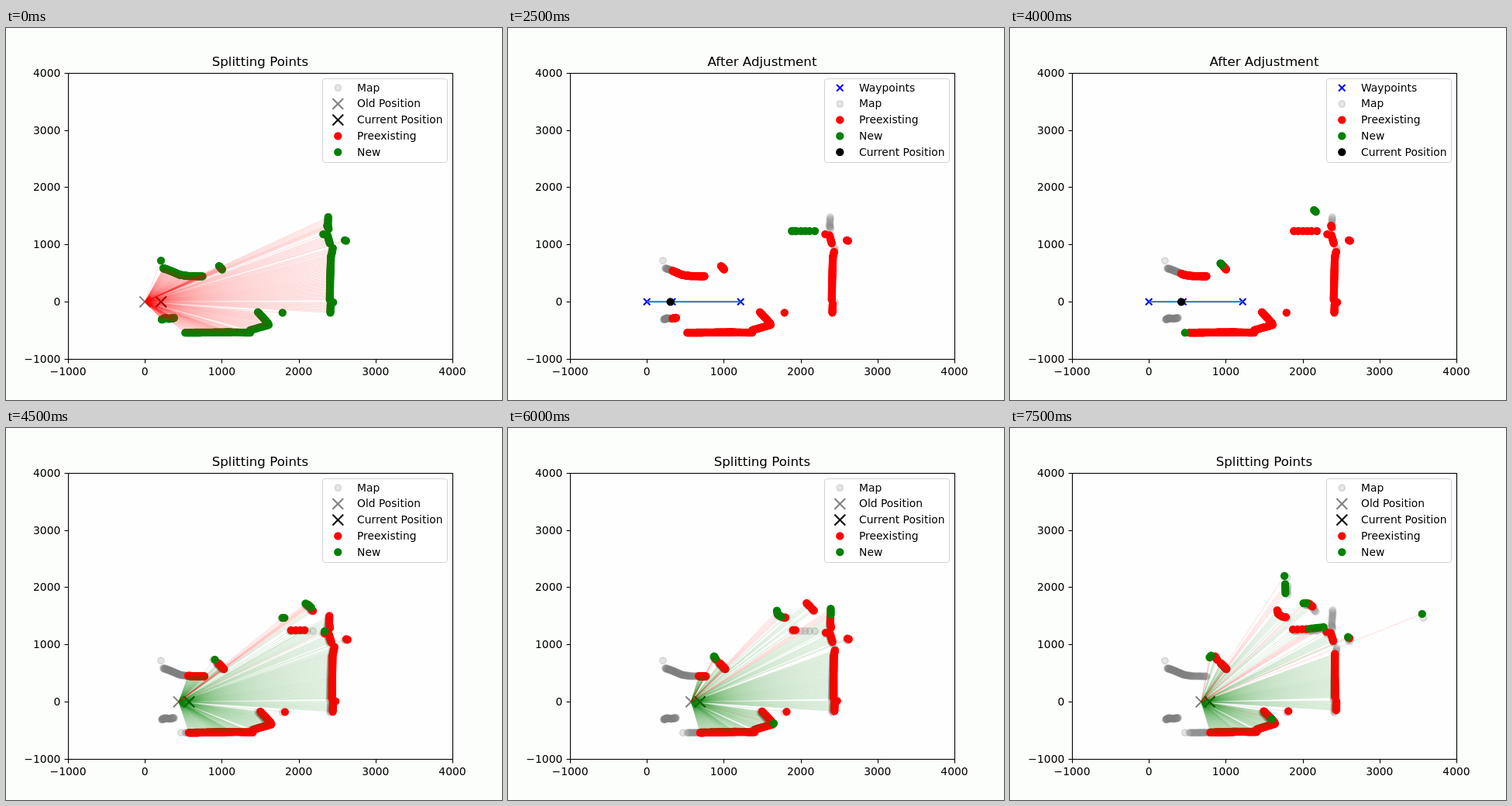
Animation of 640 by 480 pixels, one loop 8000 ms. Source, as an HTML page:

```html
<!DOCTYPE html>
<html lang="en">
<head>
<meta charset="utf-8">
<title>Splitting Points</title>
<style>
  html, body { margin: 0; width: 100%; height: 100%; overflow: hidden; background: #fcfefb; }
  svg { display: block; width: 640px; height: 480px; font: 13.89px "DejaVu Sans", sans-serif; }
</style>
</head>
<body>
<svg id="stage" viewBox="0 0 640 480"></svg>
<script>
const STEP = 500, LOOP = 8000, BEAM = 0.008, GOAL = 1220;
const stage = document.getElementById('stage');

// One entry per scan: pose before and after moving, and the drift of its readings.
const scans = [
  { old: 0,   cur: 210, dx: 0,   turn: 0 },
  { old: 205, cur: 330, dx: -15, turn: 0.003 },
  { old: 325, cur: 445, dx: 15,  turn: 0.005 },
  { old: 440, cur: 575, dx: 30,  turn: 0.01 },
  { old: 575, cur: 690, dx: 25,  turn: 0.015 },
  { old: 680, cur: 790, dx: 20,  turn: 0.026 }
];

// Walls are polylines; "seen" lists the scans that hit them, the first being the discovery.
const walls = [];
function wall(seen, ...xy) {
  const path = [];
  for (let i = 0; i < xy.length; i += 2) path.push([xy[i], xy[i + 1]]);
  walls.push({ seen, born: +seen[0], path });
}
const ALL = '012345';
wall('0', 210, 720);
wall(ALL, 240, 585, 300, 560, 380, 515, 460, 470, 560, 450, 750, 445);
wall(ALL, 965, 625, 1005, 565);
wall(ALL, 220, -310, 260, -285, 320, -295, 380, -280);
wall(ALL, 525, -540, 1120, -530, 1370, -540);
wall(ALL, 1370, -495, 1500, -445, 1610, -405, 1600, -370, 1560, -310, 1470, -180);
wall(ALL, 1790, -190);
wall('034', 2385, 1480, 2380, 1350, 2390, 1270);
wall('02', 2370, 1330, 2378, 1300);
wall(ALL, 2320, 1180);
wall(ALL, 2375, 1160, 2405, 1020);
wall(ALL, 2600, 1075, 2618, 1064);
wall('03', 2445, 940, 2438, 890);
wall('01234', 2435, 870, 2425, 815);
wall(ALL, 2420, 795, 2410, 400, 2405, 35);
wall('0234', 2450, -10);
wall(ALL, 2417, -30, 2412, -190);
for (const x of [1885, 1945, 2005, 2060]) wall('1235', x, 1235);
wall('14', 1895, 1235, 1925, 1235);
for (const x of [2115, 2185]) wall('12', x, 1235);
wall('234', 2148, 1600, 2172, 1572);
wall('2345', 930, 672, 955, 640);
wall('2', 470, -540);
wall('345', 1775, 1455, 1800, 1455);
wall('34', 2078, 1703, 2120, 1650);
wall('35', 2105, 1683, 2150, 1630);
wall('3', 2322, 1214);
wall('345', 888, 732);
wall('45', 862, 790, 875, 755);
wall('45', 1690, 1575, 1700, 1510, 1745, 1470);
wall('4', 2390, 1600, 2390, 1500);
wall('4', 1620, -390);
wall('5', 1800, 2170);
wall('5', 1805, 2030, 1805, 1870);
wall('5', 2034, 1688, 2074, 1688);
wall('5', 2100, 1240, 2285, 1265);
wall('5', 2599, 1083);
wall('5', 3572, 1462);
wall('5', 790, 775, 810, 805);
wall('5', 1572, -320);

// Points where evenly spaced beams from eye meet a wall.
function sample(path, eye) {
  const out = [path[0]];
  for (let i = 1; i < path.length; i++) {
    const [a, b] = [path[i - 1], path[i]];
    const sweep = Math.atan2(a[1], a[0] - eye) - Math.atan2(b[1], b[0] - eye);
    const n = Math.max(1, Math.round(Math.abs(sweep) / BEAM));
    for (let j = 1; j <= n; j++)
      out.push([a[0] + (b[0] - a[0]) * j / n, a[1] + (b[1] - a[1]) * j / n]);
  }
  return out;
}

const px = x => 80 + (x + 1000) * 0.0992;
const py = y => 427.2 - (y + 1000) * 0.07392;
const snap = v => Math.round(v) + 0.5;

// Fill and edge are blended separately, so faint dots show a darker rim.
const dot = (x, y, color, alpha = 1) =>
  `<circle cx="${x.toFixed(1)}" cy="${y.toFixed(1)}" r="4.17" fill="${color}" stroke="${color}" stroke-width="2" fill-opacity="${alpha}" stroke-opacity="${alpha}"/>`;
const cross = (x, y, color, r) =>
  `<path d="M${x - r} ${y - r}l${2 * r} ${2 * r}m0 ${-2 * r}l${-2 * r} ${2 * r}" stroke="${color}" stroke-width="2.08"/>`;
const line = (x1, y1, x2, y2, color, width, alpha = 1) =>
  `<path d="M${x1} ${y1}L${x2} ${y2}" stroke="${color}" stroke-width="${width}" opacity="${alpha}"/>`;
const text = (x, y, anchor, str, size = 13.89) =>
  `<text x="${x}" y="${Math.round(y)}" text-anchor="${anchor}" font-size="${size}">${str}</text>`;

const mapDot = (x, y) => dot(x, y, 'gray', 0.2);
const redDot = (x, y) => dot(x, y, 'red');
const newDot = (x, y) => dot(x, y, 'green');
const hereDot = (x, y) => dot(x, y, 'black');
const oldCross = (x, y) => cross(x, y, 'gray', 6.9);
const curCross = (x, y) => cross(x, y, 'black', 6.9);
const wayCross = (x, y) => cross(x, y, 'blue', 4.2);

const splitLegend = [['Map', mapDot], ['Old Position', oldCross], ['Current Position', curCross],
  ['Preexisting', redDot], ['New', newDot]];
const adjustLegend = [['Waypoints', wayCross], ['Map', mapDot], ['Preexisting', redDot],
  ['New', newDot], ['Current Position', hereDot]];

function axes(title) {
  let s = '<rect x="80.5" y="58.5" width="496" height="369" fill="none" stroke="#000" stroke-width="1.1"/>';
  for (let v = -1000; v <= 4000; v += 1000) {
    const label = String(v).replace('-', '\u2212'), x = snap(px(v)), y = snap(py(v));
    s += line(x, 428, x, 432.5, '#000', 1.1) + text(px(v), 448, 'middle', label);
    s += line(75.5, y, 80, y, '#000', 1.1) + text(70.3, py(v) + 5, 'end', label);
  }
  return s + text(328, 49, 'middle', title, 16.67);
}

function legend(rows) {
  let s = '<rect x="408.5" y="65.5" width="161" height="108" rx="3" fill="#fff" fill-opacity=".8" stroke="#ccc" stroke-opacity=".85"/>';
  rows.forEach(([label, mark], i) => {
    const y = 77.2 + i * 20.75;
    s += mark(428.3, y) + text(453, y + 4.4, 'start', label);
  });
  return s;
}

function render(step) {
  const k = Math.floor(step / 3), phase = step % 3;
  const { old, cur, dx, turn } = scans[k];
  const after = phase === 2;
  const place = ([x, y]) => after ? [px(x), py(y)]
    : [px(x + dx - turn * y), py(y + turn * (x - cur))];
  let map = '', red = '', fresh = '', rays = '';

  for (const { seen, born, path } of walls) {
    if (born > k) continue;
    for (const [x, y] of sample(path, scans[born].old)) map += mapDot(px(x), py(y));
    if (!seen.includes(k)) continue;
    for (const p of sample(path, old)) {
      if (k && p[0] < cur - dx - 10) continue;
      const [x, y] = place(p), isNew = born === k;
      if (isNew) fresh += newDot(x, y); else red += redDot(x, y);
      rays += line(px(old), py(0), x.toFixed(1), y.toFixed(1), isNew ? 'red' : 'green', 1, 0.14);
    }
  }

  const y0 = py(0);
  let body;
  if (phase === 0) {
    body = map + oldCross(px(old), y0) + curCross(px(cur), y0) + red + fresh + rays;
  } else {
    const here = after ? cur - (k ? 24 : 5) : cur;
    body = [0, cur, GOAL].map(x => wayCross(px(x), y0)).join('') + map + red + fresh
      + line(px(0), y0, px(GOAL), y0, '#1f77b4', 2.08) + hereDot(px(here), y0);
  }
  const title = ['Splitting Points', 'Before Adjustment', 'After Adjustment'][phase];
  stage.innerHTML = '<rect x="80" y="58" width="496" height="370" fill="#fefefe"/><g fill="none">'
    + body + '</g>' + axes(title) + legend(phase ? adjustLegend : splitLegend);
}

const start = performance.now();
let shown = -1;
function tick() {
  const step = Math.floor((performance.now() - start) % LOOP / STEP);
  if (step !== shown) render(shown = step);
  requestAnimationFrame(tick);
}
tick();
</script>
</body>
</html>
```
